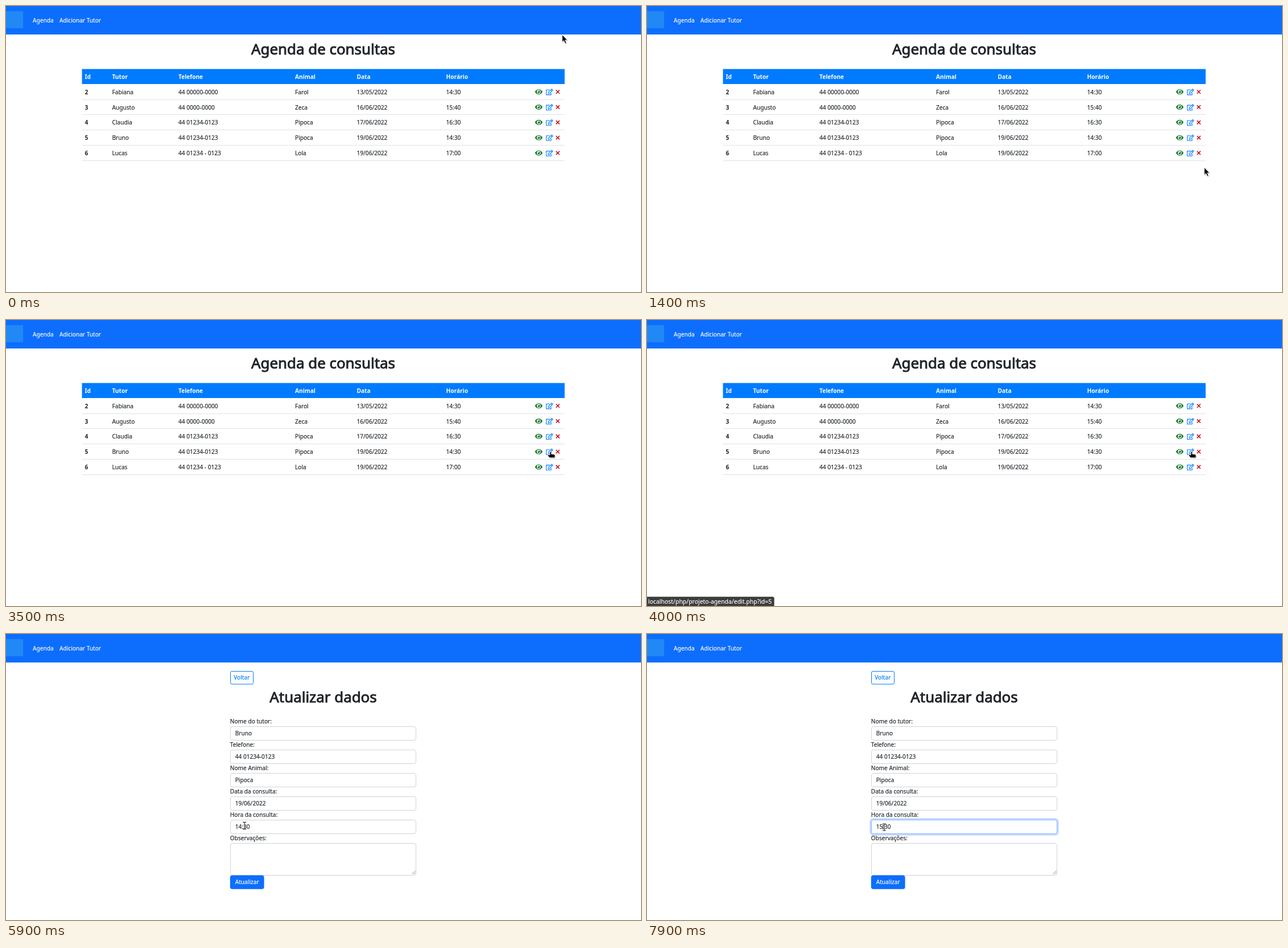
An HTML page that plays this animation: 1116x502 px, repeating every 8 s.

```html
<!DOCTYPE html>
<html lang="pt-BR">
<head>
<meta charset="utf-8">
<title>Agenda de consultas</title>
<style>
  html, body { margin: 0; width: 100%; height: 100%; overflow: hidden; background: #fff; }
  svg { display: block; }
  text {
    font: 10.15px "Noto Sans", "Open Sans", sans-serif; white-space: pre;
    color: #212529; fill: currentColor; stroke: currentColor; stroke-width: .15px;
  }
  .bold { font-weight: 700; stroke-width: 0; }
  .light { color: #fff; }
  .mid { text-anchor: middle; }
  .title { font-size: 25.9px; stroke-width: .95px; text-anchor: middle; }
  .link { color: #007bff; }
  .status { font-size: 10.45px; color: #fff; }
  .field { fill: #fff; stroke: #ced4da; }
</style>
</head>
<body>
<svg width="1116" height="502" viewBox="0 0 1116 502">
  <defs>
    <filter id="shade" x="-50%" y="-50%" width="220%" height="220%">
      <feDropShadow dx=".8" dy="1" stdDeviation=".7" flood-opacity=".35"/>
    </filter>
    <g id="eye" transform="translate(929.6 -5.9) scale(.0232)">
      <path fill="#147a2a" d="M0 256C60 136 165 64 288 64S516 136 576 256C516 376 411 448 288 448S60 376 0 256Z"/>
      <circle cx="288" cy="256" r="144" fill="#fff"/>
      <circle cx="288" cy="256" r="96" fill="#147a2a"/>
      <circle cx="240" cy="208" r="44" fill="#fff"/>
    </g>
    <g id="edit" transform="translate(949 -5.2) scale(.0214)" fill="none" stroke="#007bff" stroke-width="50" stroke-linejoin="round">
      <path d="M318 88H24V488H424V328"/>
      <path d="M192 290L474 14L562 102L285 382L184 392ZM419 99L477 157"/>
    </g>
    <path id="cross" d="M966.6 -3.1l6.2 6.2m0 -6.2l-6.2 6.2" fill="none" stroke="#c9101f" stroke-width="1.6"/>
    <path id="bar" d="M-3 -6H-1Q0 -6 0 -5V5Q0 6 -1 6H-3M3 -6H1Q0 -6 0 -5M0 5Q0 6 1 6H3" fill="none"/>
  </defs>

  <rect width="1116" height="50" fill="#0d6efd"/>
  <rect y="9" width="30" height="30" fill="#2089f5"/>
  <text class="light" x="47" y="28.5">Agenda</text>
  <text class="light" x="94" y="28.5">Adicionar Tutor</text>

  <g id="list"></g>
  <g id="form"></g>

  <g id="status">
    <path d="M0 485.7H220.5Q223.6 485.7 223.6 488.8V502H0Z" fill="#3d3d3d"/>
    <text class="status" x="2" y="497.8">localhost/php/projeto-agenda/edit.php?id=5</text>
  </g>

  <g id="cursor">
    <path id="arrow" filter="url(#shade)" d="M0 0V12.6L2.9 10L5.1 15L7.3 14L5.1 9.3H9Z" stroke="#fff" stroke-width=".7"/>
    <path id="hand" filter="url(#shade)" d="M-1.2 .4Q0 -1 1.2 .4V4.2L6.6 5Q7.8 5.4 7.8 6.8V9.2L6.6 10.8H-1.4L-5 6.8Q-4.4 5 -1.2 6Z" stroke="#fff" stroke-width=".7"/>
    <g id="beam">
      <use href="#bar" stroke="#fff" stroke-width="2.2"/>
      <use href="#bar" stroke="#222" stroke-width="1.1"/>
    </g>
  </g>
</svg>
<script>
const $ = id => document.getElementById(id);
const LOOP = 8000, STEP = 100;

const text = (x, y, s, cls = "") => `<text class="${cls}" x="${x}" y="${y}">${s}</text>`;
const box = (x, y, w, h, r, attrs) =>
  `<rect x="${x}" y="${y}" width="${w}" height="${h}" rx="${r}" ${attrs}/>`;

// Appointment list
const cols = [138.5, 186.5, 303, 508, 616.5, 773.5];
const heads = ["Id", "Tutor", "Telefone", "Animal", "Data", "Horário"];
const rows = [
  ["Fabiana", "44 00000-0000", "Farol", "13/05/2022", "14:30"],
  ["Augusto", "44 0000-0000", "Zeca", "16/06/2022", "15:40"],
  ["Claudia", "44 01234-0123", "Pipoca", "17/06/2022", "16:30"],
  ["Bruno", "44 01234-0123", "Pipoca", "19/06/2022", "14:30"],
  ["Lucas", "44 01234 - 0123", "Lola", "19/06/2022", "17:00"]
];

function drawList() {
  let out = text(557.5, 85.2, "Agenda de consultas", "title");
  out += box(133.5, 110.6, 848.3, 26.4, 0, 'fill="#007bff"');
  heads.forEach((h, i) => out += text(cols[i], 128, h, "bold light"));
  rows.forEach((row, r) => {
    const y = 150.8 + r * 26.83;
    [r + 2, ...row].forEach((s, i) => out += text(cols[i], y + 3.9, s, i ? "" : "bold"));
    for (const icon of ["eye", "edit", "cross"]) out += `<use href="#${icon}" y="${y - .2}"/>`;
    out += box(133.5, Math.round(y + 12.8), 848.3, 1, 0, 'fill="#dee2e6"');
  });
  $("list").innerHTML = out;
}

// Edit form, filled from the row being edited
const labels = ["Nome do tutor:", "Telefone:", "Nome Animal:", "Data da consulta:", "Hora da consulta:", "Observações:"];
const fieldY = i => Math.round(162.1 + i * 40.9) + .5;

function drawForm() {
  const hourY = fieldY(4), values = rows[3].slice(0, 4);
  let out = box(394.5, 65.5, 40, 22.5, 2.5, 'fill="#fff" stroke="#007bff"');
  out += text(414.3, 80.2, "Voltar", "link mid");
  out += text(557.5, 120.3, "Atualizar dados", "title");
  labels.forEach((label, i) => {
    const y = fieldY(i);
    out += text(393.8, y - 5.2, label);
    out += box(394.5, y, 326, i < 5 ? 24 : 56, 3.5, 'class="field"');
    if (values[i]) out += text(402.7, y + 15.2, values[i]);
  });
  out += `<g id="focus">
    ${box(392.7, hourY - 1.8, 329.6, 27.6, 5, 'fill="none" stroke="#0d6efd" stroke-opacity=".25" stroke-width="2.7"')}
    ${box(394.5, hourY, 326, 24, 3.5, 'fill="#fff" stroke="#86b7fe"')}</g>`;
  out += text(402.7, hourY + 15.2, '<tspan id="hour"></tspan>');
  out += box(0, hourY + 6, .8, 10.5, 0, 'id="caret" fill="#212529"');
  out += '<path d="M713.5 421.5l6-6m-2.7 6l2.7-2.7" stroke="#777" stroke-width=".8"/>';
  out += box(393.8, 423.4, 59.8, 24.4, 4, 'fill="#0d6efd"');
  out += text(423.7, 439, "Atualizar", "light mid");
  $("form").innerHTML = out;
}

// Pointer strokes: start, end, target point, optional bend point
const home = [977.5, 50.5];
const moves = [
  [200, 900, [1071, 250], [1033, 77]],
  [900, 1100, [994, 281], [1060, 290]],
  [1300, 2200, [889.5, 268], [927, 295]],
  [2200, 2500, [902, 245], [886, 254]],
  [2900, 3100, [957, 252]],
  [3200, 3500, [957, 231], [962, 240]],
  [4600, 4800, [491.5, 215]],
  [4900, 5000, [451.5, 246]],
  [5200, 5400, [423.5, 330]],
  [5500, 6200, [417, 339], [419, 337]]
];

function place(t) {
  let at = home;
  for (const [start, end, to, bend] of moves) {
    if (t <= start) break;
    const k = Math.min(1, (t - start) / (end - start));
    at = at.map((a, i) => {
      const mid = bend ? bend[i] : (a + to[i]) / 2;
      return (1 - k) ** 2 * a + 2 * k * (1 - k) * mid + k * k * to[i];
    });
  }
  return at;
}

const show = (id, on) => $(id).style.display = on ? "" : "none";
const ramp = (t, start) => t < start ? 0 : t < start + STEP ? .5 : 1;

function render(ms) {
  const t = Math.floor(ms / STEP) * STEP;
  const [x, y] = place(t);
  const kind = t < 3100 ? "arrow" : t < 4700 ? "hand" : t < 5000 ? "arrow" : "beam";
  $("cursor").setAttribute("transform", `translate(${x} ${y})`);
  for (const k of ["arrow", "hand", "beam"]) show(k, k === kind);

  show("list", t < 4400);
  show("form", t >= 4400);
  $("status").style.opacity = t < 4500 ? ramp(t, 3700) : 0;
  $("focus").style.opacity = ramp(t, 6600);

  const hour = t < 7600 ? "14" : t < 7800 ? "1" : "15";
  $("hour").textContent = hour + ":30";
  show("caret", t >= 6600);
  $("caret").setAttribute("x", t < 7200 ? 416.9 : 402.7 + hour.length * 5.8);
}

function tick() {
  render(performance.now() % LOOP);
  requestAnimationFrame(tick);
}

drawList();
drawForm();
tick();
</script>
</body>
</html>
```
